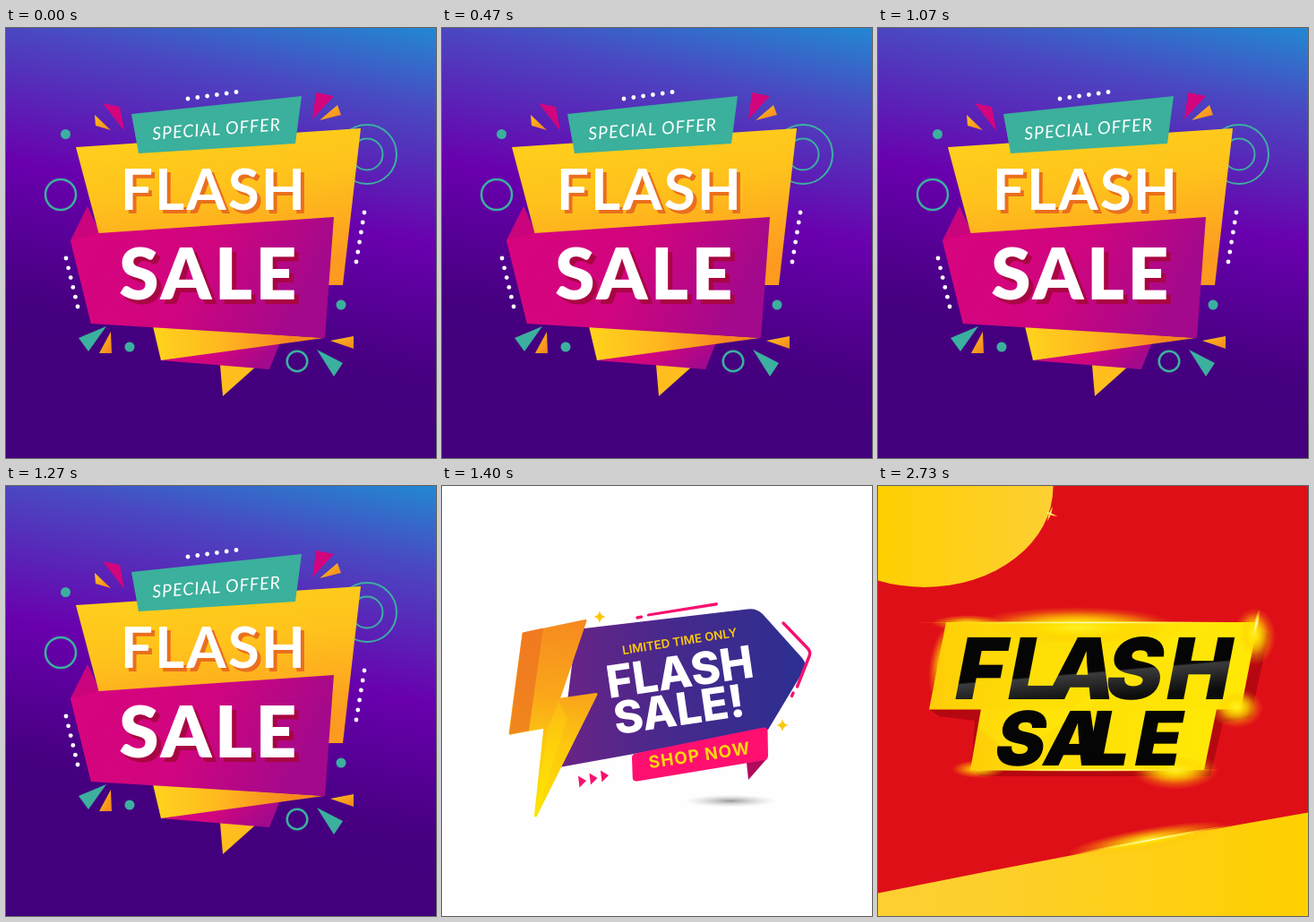
Write an HTML page that moves like this. It is 480 px wide and 480 px high and loops after 3.99 s.

```html
<!DOCTYPE html>
<html lang="en">
<head>
<meta charset="utf-8">
<title>Flash sale</title>
<style>
  html, body { margin: 0; width: 100%; height: 100%; overflow: hidden; background: #fff; }
  svg { display: block; width: 100vw; height: 100vh; }
  .lato { font-family: Lato, "Open Sans", sans-serif; }
  .inter { font-family: Inter, Roboto, sans-serif; }
  .mid { text-anchor: middle; }
</style>
</head>
<body>
<svg viewBox="0 0 480 480" xmlns="http://www.w3.org/2000/svg">
  <defs>
    <linearGradient id="night" gradientUnits="userSpaceOnUse" x1="480" y1="0" x2="390" y2="450">
      <stop offset="0" stop-color="#2288d2"/><stop offset=".2" stop-color="#4a48c1"/>
      <stop offset=".52" stop-color="#6900ae"/><stop offset=".85" stop-color="#45007f"/>
      <stop offset="1" stop-color="#42007c"/>
    </linearGradient>
    <linearGradient id="amber" x1="0" y1="0" x2=".25" y2="1">
      <stop offset="0" stop-color="#ffd21c"/><stop offset=".45" stop-color="#ffc31c"/><stop offset="1" stop-color="#fd9a20"/>
    </linearGradient>
    <linearGradient id="strip" x1="0" y1="0" x2="1" y2="0">
      <stop offset="0" stop-color="#ffd31c"/><stop offset=".4" stop-color="#ffb81f"/><stop offset=".8" stop-color="#f7871f"/>
    </linearGradient>
    <linearGradient id="pink" x1="0" y1="0" x2="1" y2=".25">
      <stop offset="0" stop-color="#d8047e"/><stop offset=".55" stop-color="#d0057f"/><stop offset="1" stop-color="#a3098c"/>
    </linearGradient>
    <linearGradient id="spark" x1="0" y1="0" x2="1" y2="1">
      <stop offset="0" stop-color="#ffc41c"/><stop offset="1" stop-color="#f58220"/>
    </linearGradient>
    <linearGradient id="body" x1="0" y1="0" x2="1" y2="0">
      <stop offset="0" stop-color="#6a2386"/><stop offset=".45" stop-color="#47298c"/><stop offset="1" stop-color="#2b2f91"/>
    </linearGradient>
    <linearGradient id="bolt" gradientUnits="userSpaceOnUse" x1="135" y1="150" x2="112" y2="371">
      <stop offset="0" stop-color="#f68b1f"/><stop offset=".38" stop-color="#faa61a"/>
      <stop offset=".62" stop-color="#fdc70f"/><stop offset="1" stop-color="#fde500"/>
    </linearGradient>
    <radialGradient id="shade">
      <stop offset="0" stop-color="#77777c" stop-opacity=".75"/><stop offset=".5" stop-color="#999" stop-opacity=".35"/>
      <stop offset="1" stop-color="#bbb" stop-opacity="0"/>
    </radialGradient>
    <linearGradient id="disc" x1="0" y1="0" x2="1" y2="0">
      <stop offset=".3" stop-color="#fed000"/><stop offset="1" stop-color="#fdcf33"/>
    </linearGradient>
    <linearGradient id="floor" x1="0" y1="0" x2="1" y2="0">
      <stop offset="0" stop-color="#fdcf33"/><stop offset=".25" stop-color="#fdcf2c"/><stop offset="1" stop-color="#fed000"/>
    </linearGradient>
    <linearGradient id="panel" x1="0" y1="0" x2="1" y2="0">
      <stop offset="0" stop-color="#fecd08"/><stop offset=".3" stop-color="#fede06"/><stop offset="1" stop-color="#ffe806"/>
    </linearGradient>
    <linearGradient id="gloss" gradientUnits="userSpaceOnUse" x1="240" y1="-69" x2="246" y2="0">
      <stop offset="0" stop-color="#050505"/><stop offset=".54" stop-color="#050505"/>
      <stop offset=".57" stop-color="#3b3b3b"/><stop offset="1" stop-color="#0c0c0c"/>
    </linearGradient>
    <radialGradient id="glow">
      <stop offset="0" stop-color="#fff22a" stop-opacity=".95"/><stop offset=".4" stop-color="#ffe000" stop-opacity=".65"/>
      <stop offset="1" stop-color="#ffb000" stop-opacity="0"/>
    </radialGradient>
    <radialGradient id="streak">
      <stop offset="0" stop-color="#fffde0"/><stop offset=".45" stop-color="#fff04a" stop-opacity=".9"/>
      <stop offset="1" stop-color="#ffd000" stop-opacity="0"/>
    </radialGradient>
  </defs>

  <g class="slide">
    <rect width="480" height="480" fill="url(#night)"/>
    <g fill="none" stroke="#3bb09f" stroke-width="2">
      <circle cx="403" cy="141" r="33"/><circle cx="403" cy="141" r="17.5"/>
      <circle cx="61" cy="186" r="17" stroke-width="2.5"/><circle cx="325" cy="372" r="11.3" stroke-width="2.5"/>
    </g>
    <g fill="#3bb09f">
      <circle cx="66.5" cy="118.500" r="5.5"/><circle cx="374" cy="309" r="5.5"/><circle cx="138" cy="356" r="5.5"/>
      <path d="M81 346L112 333L92 361ZM347 359L376 374L366 389Z"/>
    </g>
    <path fill="#d3057e" d="M108 84L127 88L132 115ZM346 72L366 76L342 102Z"/>
    <path fill="url(#spark)" d="M99 97L117 114L100 109Z"/>
    <path fill="url(#spark)" d="M370 86L374 97L350 103Z"/>
    <path fill="url(#spark)" d="M117 339L118 363L104 363Z"/>
    <path fill="url(#spark)" d="M362 349L388 344L388 358Z"/>
    <g id="dots" fill="#fff"></g>
    <path fill="#ffbd1e" d="M239 376L279 378L242 411Z"/>
    <path fill="url(#pink)" d="M173 371L306 351L294 381Z"/>
    <path fill="url(#strip)" d="M164 333L355 346L173 371Z"/>
    <path fill="#c9047c" d="M91 199L72 237L95 330L110 240Z"/>
    <path fill="url(#amber)" d="M78 133L396 112L376 287L340 287L104 231Z"/>
    <path fill="url(#pink)" d="M72 237L104 229L366 211L356 346L95 330Z"/>
    <path fill="#3bb09c" d="M140 96L330 76L323 129L148 140Z"/>
    <text class="lato mid" transform="translate(235.500 119.500) rotate(-4.2)" font-size="19.5" font-weight="400" font-style="italic" letter-spacing="1" fill="#fff">SPECIAL OFFER</text>
    <g class="lato mid" font-size="64" font-weight="700" letter-spacing="2">
      <text x="236" y="207" fill="#ea6f1e">FLASH</text>
      <text x="232" y="203" fill="#fff">FLASH</text>
    </g>
    <g class="lato mid" font-size="80" font-weight="900" letter-spacing="3.5">
      <text x="232" y="307.500" fill="#a80642">SALE</text>
      <text x="227" y="302.500" fill="#fff">SALE</text>
    </g>
  </g>

  <g class="slide">
    <rect width="480" height="480" fill="#fefefe"/>
    <ellipse cx="322" cy="351.500" rx="52" ry="7" fill="url(#shade)"/>
    <path fill="url(#body)" d="M150 160L341 137.500Q351 136 358 143L402 192Q408 199 403 207L364 272L131 314L140 240Z"/>
    <path fill="url(#bolt)" stroke="url(#bolt)" stroke-width="3" stroke-linejoin="round" d="M91 165L160 150.500L130 238.500L172 232.500L104.500 368L115 269L76 276Z"/>
    <path fill="#ee7320" opacity=".75" d="M90 163.500L113 158.500L97 273L75 277.500Z"/>
    <path fill="#fff200" opacity=".2" d="M130 240L118 271L104.500 368L140 260Z"/>
    <g fill="none" stroke="#f7106f" stroke-linecap="round" stroke-linejoin="round" stroke-width="3.4">
      <path d="M218 147L222.500 146.200M381 153L408 181Q412 185 410 190L396.500 224M392 231L390.500 234.500"/>
    </g>
    <path fill="#f7106f" d="M230 142.500L307 130Q309 132 307 133.500L230 145.500Q227.500 144.500 230 142.500Z"/>
    <g id="stars" fill="#fbc70d"></g>
    <g id="arrows" fill="#f7106f"></g>
    <path fill="#b00a5c" d="M340 309L363 304L342 328Z"/>
    <path fill="#ff1070" d="M216 298.500L359 269.500Q363 269 363.500 273L364 301Q364 305 360 306L218 329.500Q213 330 212.800 326L212 303Q212 299.500 216 298.500Z"/>
    <g class="inter mid">
      <text transform="translate(266 178) rotate(-9)" font-size="13.3" font-weight="600" fill="#fcca0c">LIMITED TIME ONLY</text>
      <text transform="translate(268 225) rotate(-8.3)" font-size="50" font-weight="800" fill="#fff">FLASH</text>
      <text transform="translate(267 267) rotate(-8.3)" font-size="50" font-weight="800" fill="#fff">SALE!</text>
      <text transform="translate(288.500 307) rotate(-8.3)" font-size="19" font-weight="700" letter-spacing="1" fill="#ffd60a">SHOP NOW</text>
    </g>
  </g>

  <g class="slide">
    <rect width="480" height="480" fill="#df0f18"/>
    <ellipse cx="52" cy="1.500" rx="143.500" ry="111.500" fill="url(#disc)"/>
    <path fill="url(#floor)" d="M0 454.500Q240 406 480 364.500V480H0Z"/>
    <path fill="#a5070e" opacity=".7" d="M424 160L436 166L416 259L385 264L371 324L114 324L104 316L108 262L68 257L57 249H405Z"/>
    <g id="back" fill="url(#glow)"></g>
    <path fill="url(#panel)" d="M76 152H424L405 249.500H57Z"/>
    <path fill="url(#panel)" d="M115 249H378L364 317H103Z"/>
    <path fill="#ffec10" opacity=".35" d="M350 152H385L150 300L112 270L115 249H215Z"/>
    <g id="front" fill="url(#glow)"></g>
    <g id="rays" fill="url(#streak)"></g>
    <g class="inter" font-weight="900">
      <text transform="translate(0 238) skewX(-11)" x="82 141 185 250 318" y="0" font-size="95" fill="url(#gloss)">FLASH</text>
      <text transform="translate(0 311.500) skewX(-11)" x="127 181 229 283" y="0" font-size="84" fill="#050505">SALE</text>
    </g>
  </g>
</svg>
<script>
  const LOOP = 3990, CUTS = [1330, 2670];
  const slides = document.querySelectorAll(".slide");

  function add(id, tag, attrs) {
    const el = document.createElementNS("http://www.w3.org/2000/svg", tag);
    for (const key in attrs) el.setAttribute(key, attrs[key]);
    document.getElementById(id).appendChild(el);
  }

  function dotRow(x1, y1, x2, y2) {
    for (let i = 0; i < 6; i++) {
      const u = i / 5;
      add("dots", "circle", { cx: x1 + (x2 - x1) * u, cy: y1 + (y2 - y1) * u, r: 2.4 });
    }
  }

  function oval(id, cx, cy, rx, ry, turn = 0) {
    add(id, "ellipse", { cx, cy, rx, ry, transform: `rotate(${turn} ${cx} ${cy})` });
  }

  dotRow(203, 79, 257, 71.5);
  dotRow(67, 257, 80, 311);
  dotRow(400, 206, 391, 261);

  for (const [x, y] of [[176, 146], [380, 267]])
    add("stars", "path", { d: "M0-7Q1-1 7 0Q1 1 0 7Q-1 1-7 0Q-1-1 0-7Z", transform: `translate(${x} ${y})` });

  for (let i = 0; i < 3; i++)
    add("arrows", "path", { d: "M0-6.500L9-1L1.500 6.500Z", transform: `translate(${152 + 12.5 * i} ${330 - 3 * i})` });

  oval("back", 72, 195, 14, 42, 11);
  oval("back", 220, 154, 110, 19);
  oval("back", 100, 153, 40, 9);
  oval("back", 420, 168, 24, 32);
  oval("back", 400, 248, 30, 22);
  oval("back", 332, 317, 48, 22);
  oval("back", 112, 316, 30, 10);
  oval("back", 300, 394, 90, 12, -10);
  oval("front", 225, 158, 100, 18);
  oval("front", 400, 246, 22, 16);
  oval("front", 332, 317, 40, 15);
  oval("front", 420, 165, 16, 24);
  oval("rays", 235, 152.5, 195, 1.8);
  oval("rays", 235, 317, 155, 1.8);
  oval("rays", 422, 155, 3, 18, 12);
  oval("rays", 305, 395, 95, 2.2, -10.5);
  oval("rays", 192, 31, 10, 1.5, 20);
  oval("rays", 192, 31, 1.5, 10, 20);

  function draw(now) {
    const t = now % LOOP;
    const current = CUTS.filter(cut => t >= cut).length;
    slides.forEach((slide, i) => { slide.style.display = i === current ? "" : "none"; });
  }

  function tick() {
    draw(performance.now());
    requestAnimationFrame(tick);
  }
  tick();
</script>
</body>
</html>
```
